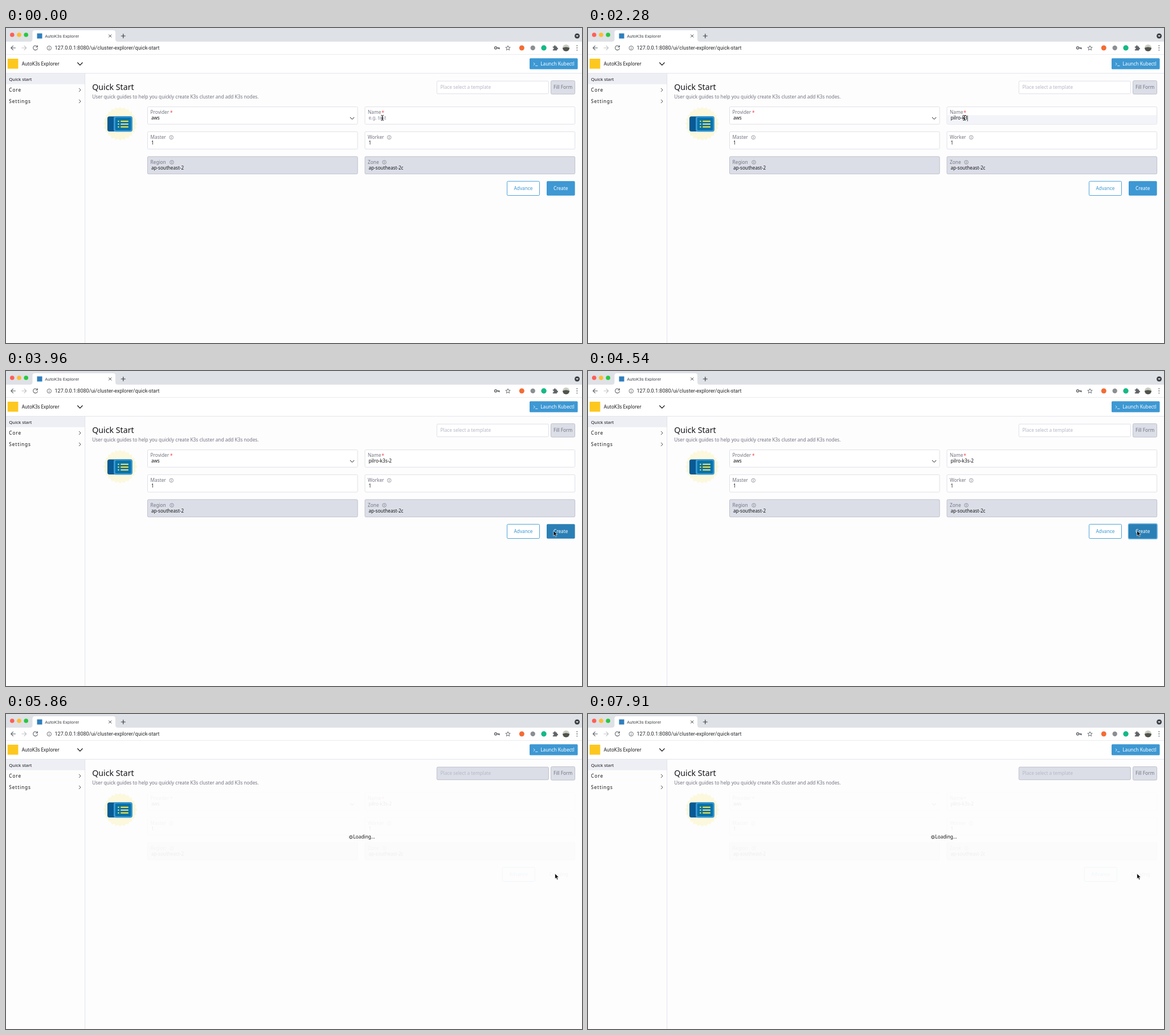
An HTML page for the animation above (8 s loop, 1011 px wide and 554 px high).

```html
<!DOCTYPE html>
<html lang="en">
<head>
<meta charset="utf-8">
<title>AutoK3s Explorer</title>
<style>
  html, body { margin: 0; width: 100%; height: 100%; overflow: hidden; background: #fdfdfd; }
  svg { display: block; width: 100%; height: 100%; }
  text { font: 8.25px "Noto Sans", "Open Sans", sans-serif; fill: #141419; white-space: pre; }
  .chrome { font-family: Roboto, Arial, sans-serif; }
  .label { fill: #717380; }
  .muted { fill: #b5b7c4; }
  .line { fill: none; stroke-linecap: round; stroke-linejoin: round; }
</style>
</head>
<body>
<svg id="stage" viewBox="0 0 1011 554" preserveAspectRatio="none"></svg>
<script>
const LOOP = 8000;
const BLUE = '#3d98d3', GREY = '#dcdee7', EDGE = '#b9bbc9', INK = '#141419', ICON = '#5f6368';

const rect = (x, y, w, h, fill, more = '') =>
  `<rect x="${x}" y="${y}" width="${w}" height="${h}" fill="${fill}" ${more}/>`;
const box = (x, y, w, h, fill, edge, more = '') =>
  rect(x, y, w, h, fill, `rx="1.8" stroke="${edge}" stroke-width=".9" ${more}`);
const disc = (x, y, r, fill, more = '') =>
  `<circle cx="${x}" cy="${y}" r="${r}" fill="${fill}" ${more}/>`;
const line = (d, color, width = 1.1, more = '') =>
  `<path class="line" d="${d}" stroke="${color}" stroke-width="${width}" ${more}/>`;
const text = (x, y, s, more = '') => `<text x="${x}" y="${y}" ${more}>${s}</text>`;
const info = (x, y, color = '#717380') =>
  disc(x, y, 3.3, 'none', `stroke="${color}" stroke-width=".7"`) +
  line(`M${x} ${y - .3}v1.7M${x} ${y - 1.6}v.1`, color, .8);

// Alternating outer and inner radii round a centre
function burst(cx, cy, outer, inner, points) {
  const pts = [];
  for (let i = 0; i < points * 2; i++) {
    const a = i * Math.PI / points, r = i % 2 ? inner : outer;
    pts.push((cx + r * Math.cos(a)).toFixed(2) + ',' + (cy + r * Math.sin(a)).toFixed(2));
  }
  return pts.join(' ');
}

function browser() {
  const lights = ['#fe5f57', '#febc2e', '#28c840'].map((c, i) => disc(10.8 + i * 12.2, 12, 3.8, c));
  const dots = [31.2, 35, 38.8].map(y => disc(1002.3, y, .9, ICON));
  return rect(0, 0, 1011, 24, '#dee1e6') + lights.join('') +
    '<path d="M42 24q4.5 0 4.5-4.5V8q0-4 4-4H188q4 0 4 4v11.500q0 4.500 4.500 4.500z" fill="#fff"/>' +
    rect(54.5, 9.5, 9, 9, '#2f7fbd') +
    text(68.3, 16.8, 'AutoK3s Explorer', 'class="chrome" style="font-size:7.8px;fill:#45484c"') +
    line('M180.500 11.800l4.400 4.400m0-4.400l-4.400 4.400', '#3c4043', 1) +
    line('M202.300 14h7m-3.500-3.500v7', '#3c4043', 1.2) +
    disc(1002.5, 14, 4.5, '#3f4246') + '<path d="M1000.200 13h4.600l-2.300 2.600z" fill="#fff"/>' +
    rect(0, 24, 1011, 22.5, '#fff') + rect(0, 46, 1011, .8, '#e0e2e5') +
    line('M16.500 35H9m3.500-3.700L8.800 35l3.700 3.700', ICON, 1.1) +
    line('M28 35h7.500m-3.500-3.700l3.700 3.700-3.700 3.700', '#bfc1c5', 1.1) +
    line('M55 33a3.900 3.900 0 1 0 .400 2.800M55.300 30.800v2.700h-2.700', ICON, 1.1) +
    disc(75.8, 35.2, 3.7, 'none', `stroke="${ICON}" stroke-width=".9"`) +
    line('M75.800 35v2M75.800 33.300v.1', ICON, .9) +
    text(85.500, 38.3, '127.0.0.1:8080/ui/cluster-explorer/quick-start', 'class="chrome" style="font-size:9.05px;fill:#27292c"') +
    disc(859.5, 35, 2, 'none', `stroke="${ICON}" stroke-width="1.4"`) + line('M862 35h4v1.800m-1.800-1.800v1.300', ICON, 1.4) +
    `<polygon points="${burst(881, 35.4, 4.4, 1.9, 5)}" transform="rotate(-90 881 35.4)" fill="none" stroke="${ICON}" stroke-width=".9"/>` +
    disc(905.3, 35, 4.5, '#f26c35') + disc(924.7, 35, 4.2, '#8b8e92') + disc(944, 35, 4.7, '#16b887') +
    `<path d="M959.800 32.500h2.100a1.500 1.500 0 1 1 2.900 0h2.200v2.200a1.500 1.500 0 1 1 0 2.900v2h-7.200v-2.200a1.400 1.400 0 1 0 0-2.700z" fill="${ICON}"/>` +
    disc(983, 35, 6, '#c9ccc2') + '<path d="M977 35a6 6 0 0 0 12 0q-6-3-12 0z" fill="#50534b"/>' + dots.join('');
}

function frame() {
  const item = (y, s) => text(5.3, y, s, 'style="letter-spacing:.9px"') +
    line(`M128.400 ${y - 5.800}l2.700 2.800-2.700 2.800`, '#33353b', .9);
  return rect(0, 46.8, 1011, 32.5, '#fff') + rect(0, 79.3, 1011, .8, GREY) +
    rect(2.8, 54, 18.600, 17.6, '#fdc81e') +
    text(27.8, 65.7, 'AutoK3s Explorer', 'style="font-size:8.15px"') +
    line('M125.700 61l4.200 4.300 4.200-4.300', INK, 1.2) +
    rect(919, 53.2, 84.5, 19.400, BLUE, 'rx="1.600"') +
    line('M926 61.200l2.300 2.100-2.300 2.100m3.500 1h3.500', '#fff', .8) +
    text(938.3, 65.7, 'Launch Kubectl', 'style="fill:#fff"') +
    rect(0, 80, 138.5, 18.800, '#eeeff4') + text(5.2, 92.6, 'Quick start', 'style="font-size:7.85px"') +
    item(112, 'Core') + item(132, 'Settings') + rect(138.3, 80, .8, 474, GREY) +
    text(151.2, 109, 'Quick Start', 'style="font-size:14.2px"') +
    text(151.3, 123.900, 'User quick guides to help you quickly create K3s cluster and add K3s nodes.', 'class="label"') +
    box(756.3, 93.3, 196, 22.400, '#fff', GREY, 'id="template"') +
    text(762.6, 107, 'Place select a template', 'class="muted"') +
    box(956.5, 92.700, 42, 23.500, GREY, EDGE) + text(977.5, 107, 'Fill Form', 'class="label" text-anchor="middle"');
}

function badge() {
  const rows = [164, 169, 174].map(y => rect(196.3, y - 1, 2.2, 2, '#f4ea4e') + rect(201.300, y - 1, 13.500, 2, '#f4ea4e'));
  return `<polygon points="${burst(200.3, 168.3, 29.6, 26.7, 24)}" fill="#fbf8dd"/>` +
    rect(178, 155.500, 28, 26.5, '#075a94', 'rx="3.500"') +
    rect(189, 155, 33, 27.5, '#3d98d3', 'rx="4"') +
    rect(191.800, 157.600, 27.600, 22.300, '#0673aa', 'rx="2"') + rows.join('');
}

function form() {
  const field = (x, y, label, value, { id = '', off = false, star = 0, hint = 0 } = {}) =>
    box(x, y, 368.600, 30.600, off ? GREY : '#fff', off ? EDGE : GREY, id && `id="${id}"`) +
    (id === 'name' ? rect(x + .4, 153.2, 367.800, 15.500, '#f3f4f9', 'id="band"') : '') +
    text(x + 5.1, y + 12.7, label, 'class="label"') +
    (star ? text(star, y + 12.9, '*', 'style="fill:#f03b3b"') : '') +
    (hint ? info(hint, y + 10) : '') +
    text(x + 6.4, y + 22.800, value, id === 'name' ? 'id="value"' : 'style="font-size:8.15px"');
  return field(248.5, 138.6, 'Provider', 'aws', { star: 288 }) +
    line('M604.300 157.300l3.300 3.300 3.300-3.300', INK, 1) +
    field(630, 138.6, 'Name', '', { id: 'name', star: 659.2 }) +
    rect(0, 154, .8, 10, INK, 'id="caret"') +
    field(248.5, 182.4, 'Master', '1', { hint: 290.2 }) +
    field(630, 182.4, 'Worker', '1', { id: 'worker', hint: 672.6 }) +
    field(248.5, 226.100, 'Region', 'ap-southeast-2', { off: true, hint: 291 }) +
    field(630, 226.100, 'Zone', 'ap-southeast-2c', { off: true, hint: 664 }) +
    '<g id="advance">' + box(879.5, 269.600, 57, 24.900, '#fff', BLUE) +
    text(908, 284.700, 'Advance', `text-anchor="middle" style="fill:${BLUE}"`) + '</g>' +
    rect(948.400, 268.700, 50.800, 26.700, 'none', 'id="ring" rx="2.500" stroke="#5fb0e4" stroke-width="1.200"') +
    rect(949, 269.300, 49.600, 25.5, BLUE, 'id="create" rx="1.800"') +
    text(973.700, 284.700, 'Create', 'id="createText" text-anchor="middle"');
}

function overlay() {
  let spokes = '';
  for (let i = 0; i < 8; i++) spokes += line('M0-2.300V-3.200', INK, .75, `transform="rotate(${i * 45})"`);
  return '<g id="loading"><g id="spinner">' + disc(0, 0, 1.900, 'none', `stroke="${INK}" stroke-width=".65"`) + spokes + '</g>' +
    text(609.500, 219.1, 'Loading...') + '</g>' +
    '<g id="beam">' + line('M-1.900-4.500q1.900 0 1.900 1.200V3.300q0 1.200-1.900 1.200M1.900-4.500q-1.900 0-1.900 1.200M0 3.300q0 1.200 1.900 1.200M-1 1h2', '#111', 1) + '</g>' +
    '<path id="arrow" d="M0 0v9.200l2.100-2 1.500 3.500 1.700-.7-1.500-3.400h2.900z" fill="#000" stroke="#fff" stroke-width=".7"/>';
}

document.getElementById('stage').innerHTML = rect(0, 0, 1011, 554, '#fdfdfd') + browser() + frame() + badge() +
  '<g id="form">' + form() + '</g>' + overlay();

const $ = id => document.getElementById(id);
const show = (id, on) => $(id).setAttribute('visibility', on ? 'visible' : 'hidden');
const set = (id, key, value) => $(id).setAttribute(key, value);

const NAME = 'pilro-k3s-2';
const KEYS = [780, 930, 1080, 1230, 1380, 1530, 1830, 2280, 2430, 2580, 2880];
const POINTER = [
  [0, 660.5, 158], [3180, 718, 197], [3330, 796, 257.3], [3480, 862, 282],
  [3630, 943, 283], [3780, 955, 282], [3960, 961, 281], [4110, 963.600, 280.700]
];
const FOCUS = 150, BLUR = 3180, HOVER = 3780, PRESS = 4250, LOAD = 4690, TICK = 146.5;

function render(t) {
  const typed = KEYS.filter(k => k <= t).length;
  const loading = t >= LOAD;
  const value = $('value');
  value.textContent = typed ? NAME.slice(0, typed) : 'e.g. test';
  value.style.fill = typed ? INK : '#85879a';
  set('caret', 'x', 636.3 + (typed ? value.getComputedTextLength() : 0));
  show('caret', t >= FOCUS && t < BLUR);
  show('band', t >= FOCUS && t < BLUR);
  set('worker', 'fill', t >= 3180 && t < 3480 ? '#f3f4f9' : '#fff');

  const [, x, y] = POINTER.filter(p => p[0] <= t).pop();
  const beam = t < 3330;
  show('beam', beam);
  show('arrow', !beam);
  set(beam ? 'beam' : 'arrow', 'transform', `translate(${x} ${y})`);

  set('form', 'opacity', loading ? .07 : 1);
  set('template', 'fill', loading ? GREY : '#fff');
  set('template', 'stroke', loading ? EDGE : GREY);
  set('advance', 'transform', `translate(${loading ? -8.2 : 0} 0)`);
  set('create', 'fill', t >= HOVER ? '#2a7fb5' : BLUE);
  show('create', !loading);
  show('ring', t >= PRESS && !loading);
  const label = $('createText');
  label.textContent = loading ? 'Creating' : 'Create';
  label.setAttribute('x', loading ? 970 : 973.7);
  label.style.fill = loading ? '#717380' : '#fff';

  show('loading', loading);
  const ticks = Math.max(0, Math.floor((t - LOAD) / TICK));
  set('spinner', 'transform', `translate(605.4 216.6) rotate(${ticks * TICK * .18})`);
}

const start = performance.now();
function loop() {
  render((performance.now() - start) % LOOP);
  requestAnimationFrame(loop);
}
loop();
</script>
</body>
</html>
```
